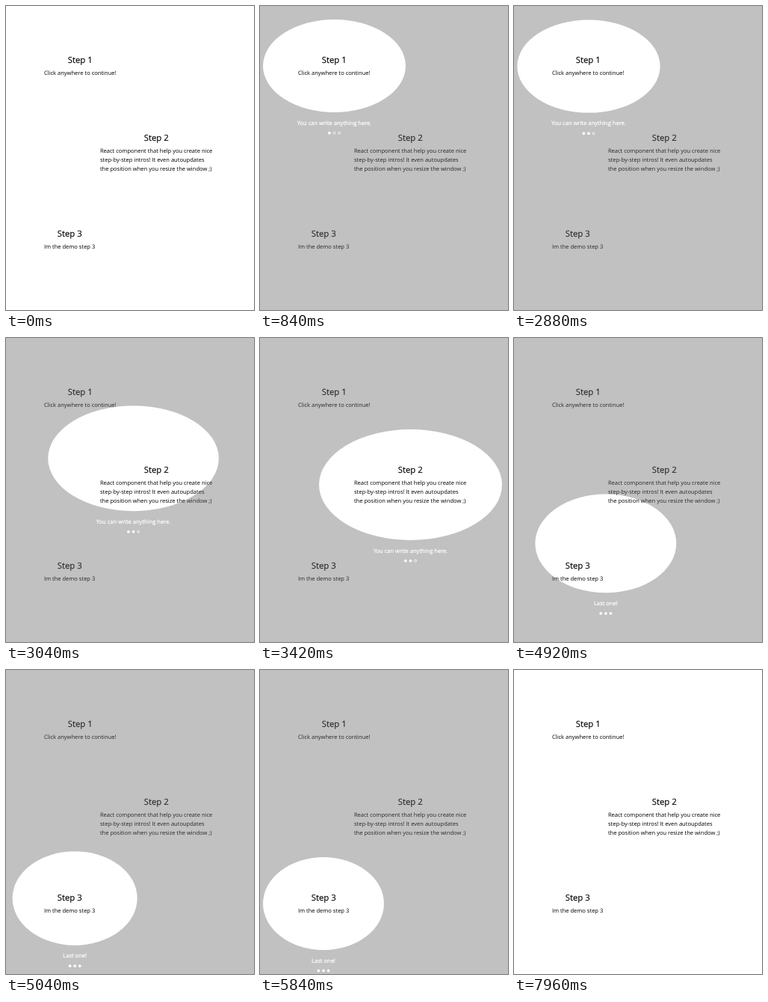
These frames come from a looping animation (332 by 406 pixels, 8 s). An HTML page:

```html
<!DOCTYPE html>
<html lang="en">
<head>
<meta charset="utf-8">
<title>Step by step intro</title>
<style>
html, body { margin: 0; width: 100%; height: 100%; overflow: hidden; background: #fff; }
svg { display: block; width: 332px; height: 406px; }
text { font: 7.55px "Open Sans", sans-serif; text-rendering: geometricPrecision; }
.title { font-size: 11.4px; text-anchor: middle; stroke: #000; stroke-width: .15px; }
#label { fill: #fff; text-anchor: middle; stroke: #fff; stroke-width: .2px; }
#dots circle { stroke: #fff; stroke-width: .8px; }
</style>
</head>
<body>
<svg viewBox="0 0 332 406">
  <text class="title" x="99.2" y="76">Step 1</text>
  <text x="50.9" y="91.7">Click anywhere to continue!</text>
  <text class="title" x="201.2" y="180">Step 2</text>
  <text x="125.9" y="195.7">React component that help you create nice</text>
  <text x="125.9" y="207.7">step-by-step intros! It even autoupdates</text>
  <text x="125.9" y="219.7">the position when you resize the window ;)</text>
  <text class="title" x="85.2" y="308">Step 3</text>
  <text x="50.9" y="323.7">Im the demo step 3</text>
  <g id="intro">
    <path id="shade" fill="#646464" fill-opacity=".4" fill-rule="evenodd"/>
    <g id="caption">
      <text id="label" y="16.6"></text>
      <g id="dots">
        <circle cx="-6.6" cy="27.6" r="1.5"/>
        <circle cy="27.6" r="1.5"/>
        <circle cx="6.6" cy="27.6" r="1.5"/>
      </g>
    </g>
  </g>
</svg>
<script>
const LOOP = 8000, MOVE = 400;
// Each spot: cx, cy, rx, ry
const steps = [
  { at: 0, spot: [99.5, 80, 95.5, 62], label: 'You can write anything here.' },
  { at: 2877, spot: [201.5, 196, 122.5, 74], label: 'You can write anything here.' },
  { at: 4763, spot: [85, 312, 81, 62], label: 'Last one!' }
];
const [intro, shade, caption, label, dots] =
  ['intro', 'shade', 'caption', 'label', 'dots'].map(id => document.getElementById(id));

// cubic-bezier(.25, .1, .25, 1)
function ease(x) {
  if (x <= 0) return 0;
  if (x >= 1) return 1;
  const bezier = (a, b, u) => 3 * a * u * (1 - u) ** 2 + 3 * b * u * u * (1 - u) + u ** 3;
  let lo = 0, hi = 1;
  for (let i = 0; i < 20; i++) {
    const mid = (lo + hi) / 2;
    if (bezier(.25, .25, mid) < x) lo = mid; else hi = mid;
  }
  return bezier(.1, 1, lo);
}

function draw(t) {
  const last = steps.length - 1;
  let n = last;
  while (t < steps[n].at) n--;
  const to = steps[n].spot, from = steps[Math.max(0, n - 1)].spot;
  const p = ease((t - steps[n].at) / MOVE);
  const [cx, cy, rx, ry] = to.map((v, i) => from[i] + (v - from[i]) * p);

  intro.setAttribute('opacity', ease((t - 488) / 380) - ease((t - 7645) / 315));
  shade.setAttribute('d', `M0 0H332V406H0Z M${cx - rx} ${cy}` +
    `a${rx} ${ry} 0 1 0 ${2 * rx} 0a${rx} ${ry} 0 1 0 ${-2 * rx} 0Z`);
  caption.setAttribute('transform', `translate(${cx} ${cy + ry})`);
  label.textContent = steps[n].label;
  [...dots.children].forEach((dot, i) => dot.setAttribute('fill', i <= n ? '#fff' : 'none'));
}

const start = performance.now();
function tick() {
  draw((performance.now() - start) % LOOP);
  requestAnimationFrame(tick);
}
tick();
</script>
</body>
</html>
```
